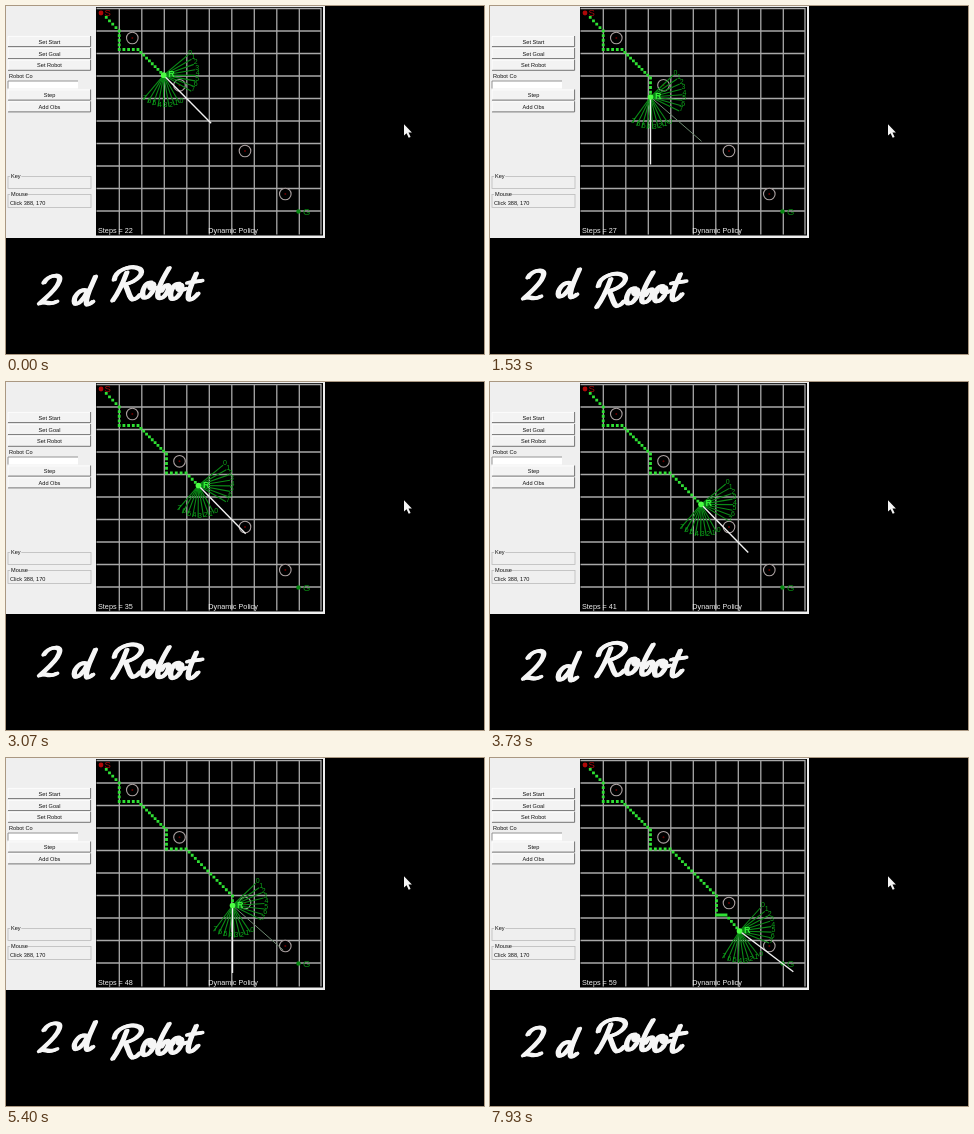
Write an HTML page that moves like this. It is 478x348 px and loops after 8 s.

```html
<!DOCTYPE html>
<html lang="en">
<head>
<meta charset="utf-8">
<title>2 d Robot</title>
<style>
html, body { margin: 0; width: 100%; height: 100%; overflow: hidden; background: #000; }
svg { display: block; width: 478px; height: 348px; }
text { font-family: "Liberation Sans", Arial, sans-serif; }
#panel text { font-size: 5.6px; fill: #111; }
#field text { font-size: 7.25px; fill: #eee; }
#fan text { font-size: 7px; fill: #0da51a; }
#title path { fill: none; stroke: #f6f6f6; stroke-width: 3.6; stroke-linecap: round; stroke-linejoin: round; }
</style>
</head>
<body>
<svg viewBox="0 0 478 348">
  <rect width="319" height="232" fill="#efefef"/>
  <g id="panel"></g>
  <g id="field">
    <rect x="90" y="1" width="227" height="228.5" fill="#000"/>
    <path id="grid" stroke="#a8a8a8" stroke-width="1.3" fill="none"/>
    <g id="obstacles"></g>
    <circle cx="95" cy="7" r="2.4" fill="#b00808"/>
    <text x="98.5" y="10" style="fill:#a80c0c;font-size:9.5px">S</text>
    <circle cx="292.5" cy="205.5" r="2.2" fill="#078a12"/>
    <text x="297" y="208.5" style="fill:#078a12;font-size:9.5px">G</text>
    <g id="fan"></g>
    <path id="trail" fill="none" stroke="#2fe034" stroke-width="2.8" stroke-linecap="square"/>
    <g id="robot">
      <circle r="2.8" fill="#4dff45"/>
      <text x="4.5" y="2" style="fill:#35f23a;font-size:9px;font-weight:bold">R</text>
    </g>
    <text id="steps" x="92" y="227"></text>
    <text x="202.3" y="227">Dynamic Policy</text>
  </g>
  <path d="M398 118.3V129.6l2.6-2.4 2.1 4.6 1.9-.9-2.1-4.4h3.4z" fill="#f4f4f4"/>
  <g id="title" role="img" aria-label="2 d Robot"></g>
</svg>
<script>
const $ = id => document.getElementById(id);
const LOOP = 8000, GOAL = [292.5, 205.5], REACH = 67.5, FAN = 32;

// [step, x, y] at each corner of the route
const route = [[0, 97, 8], [5, 113.2, 25], [9, 113.2, 43.5], [13, 132, 43.5], [23, 160.5, 72],
  [27, 160.5, 91], [31, 180, 91], [46, 226.5, 138], [50, 226.5, 157], [54, 236, 157], [59, 249.5, 173]];
// [ms, step]; the robot slows down beside obstacles
const pace = [[0, 22], [1500, 27], [2430, 30], [2600, 31], [3450, 40], [3700, 41],
  [4330, 44], [5350, 48], [6600, 54], [7900, 59], [8000, 59]];
// path, x, baseline, swing, phase of the lowest point
const letters = [
  ['M4-23C8-31 22-33 19-24C17-16 8-9 1-2C6-6 11 1 18-4', 31.5, 296.5, 3.5, .05],
  ['M13-15C6-18 0-8 2-3C4 1 11-6 14-14M21-29C17-18 12-8 14-2C15 0 18-2 20-4', 65.5, 296, 4, .98],
  ['M15-27C12-17 9-8 3 1M3-20C4-30 18-35 27-31C34-27 26-18 14-15C18-10 19-1 23 0C26 0 28-3 30-5', 103, 297, 3.5, .43],
  ['M9-16C3-17 0-7 2-2C5 2 12-5 12-12C12-16 8-16 8-12C9-9 13-9 16-11', 134, 296, 3.2, .48],
  ['M12-31C6-20 1-8 3-2C6 2 13-5 13-12C13-15 9-15 6-8M13-10C15-9 16-10 17-11', 148, 296, 2.8, .54],
  ['M9-16C3-17 0-7 2-2C5 2 12-5 12-12C12-16 8-16 8-12C9-9 13-9 16-11', 162, 296, 2.4, .6],
  ['M10-27C6-16 2-7 4-2C6 1 11-4 13-7M2-18L16-20', 177.5, 296, 2.2, .67]];

function lookup(table, key) {
  let i = 1;
  while (i < table.length - 1 && table[i][0] < key) i++;
  const a = table[i - 1], b = table[i], f = (key - a[0]) / (b[0] - a[0]);
  return a.slice(1).map((v, j) => v + (b[j + 1] - v) * f);
}

const label = (x, y, text, anchor = 'start') => `<text x="${x}" y="${y}" text-anchor="${anchor}">${text}</text>`;
const button = (y, text) =>
  `<rect x="2" y="${y}" width="83" height="11" fill="#f3f3f3"/>
   <path d="M2 ${y + 10.6}H84.6V${y}" fill="none" stroke="#666" stroke-width=".9"/>
   <path d="M2 ${y + 10}V${y + .4}H84" fill="none" stroke="#fff" stroke-width=".8"/>` + label(43.5, y + 7.7, text, 'middle');
const group = (y, h, text) =>
  `<rect x="2" y="${y}" width="83" height="${h}" fill="none" stroke="#bbb" stroke-width=".8"/>
   <rect x="4" y="${y - 2}" width="${text.length * 3.1 + 2}" height="4" fill="#efefef"/>` + label(5, y + 1.6, text);

$('panel').innerHTML = button(30, 'Set Start') + button(42, 'Set Goal') + button(53.7, 'Set Robot') +
  label(3, 72.3, 'Robot Co') +
  '<rect x="2" y="75" width="70" height="7.5" fill="#fff"/><path d="M2 82.5V75H72" fill="none" stroke="#888" stroke-width=".9"/>' +
  button(83.5, 'Step') + button(95.3, 'Add Obs') + group(170.5, 12, 'Key') + group(188.5, 13, 'Mouse') +
  label(4, 199, 'Click 388, 170');

let grid = 'M90.5 2.5H315V228.5';
for (let i = 1; i < 10; i++) grid += `M${90.8 + i * 22.5} 2V228.5M90.5 ${2.5 + i * 22.5}H315`;
$('grid').setAttribute('d', grid);

$('obstacles').innerHTML = [[126.3, 32], [173.5, 79.3], [239, 145], [279.3, 188]].map(([x, y]) =>
  `<circle cx="${x}" cy="${y}" r="5.8" fill="#000" stroke="#aaa0a0" stroke-width="1.1"/><circle cx="${x}" cy="${y}" r="1" fill="#600"/>`).join('');

// a shifted copy of each stroke imitates a broad pen
$('title').innerHTML = letters.map(([d]) => `<g><path d="${d}"/><path d="${d}" transform="translate(1.8 -.5)"/></g>`).join('');
const glyphs = [...$('title').children];

const ray = (x, y, angle, length, color, width) =>
  `<path d="M${x} ${y}l${length * Math.cos(angle)} ${length * Math.sin(angle)}" stroke="${color}" stroke-width="${width}"/>`;

function drawStep(step) {
  const [x, y] = lookup(route, step), [px, py] = lookup(route, step - 1);
  const toGoal = Math.atan2(GOAL[1] - y, GOAL[0] - x);
  const heading = x === px ? Math.PI / 2 : y === py ? 0 : toGoal;
  let fan = '';
  for (let d = -85, n = 0; d <= 85; d += 10, n++) {
    if (Math.abs(d) < 10) continue;
    const a = toGoal + d * Math.PI / 180;
    fan += ray(x, y, a, FAN, '#0b8a17', 1.1) +
      label(x + FAN * Math.cos(a), y + FAN * Math.sin(a), n % 10);
  }
  if (heading !== toGoal) fan += ray(x, y, toGoal, REACH, '#6f8a72', 1);
  $('fan').innerHTML = fan + ray(x, y, heading, REACH, '#f0f0f0', 1.4);

  let dots = '';
  for (let s = 1; s <= step; s++) dots += `M${lookup(route, s).join(' ')}h.01`;
  $('trail').setAttribute('d', dots);
  $('robot').setAttribute('transform', `translate(${x} ${y})`);
  $('steps').textContent = 'Steps = ' + step;
}

let shown = -1;
const start = performance.now();
function frame() {
  const t = (performance.now() - start) % LOOP;
  const step = Math.floor(lookup(pace, t)[0] + 1e-6);
  if (step !== shown) drawStep(shown = step);
  letters.forEach(([, x, base, swing, phase], i) => {
    const y = base + swing * Math.cos(2 * Math.PI * (t / 4000 - phase));
    glyphs[i].setAttribute('transform', `translate(${x} ${y.toFixed(2)}) skewX(-4)`);
  });
  requestAnimationFrame(frame);
}
frame();
</script>
</body>
</html>
```
